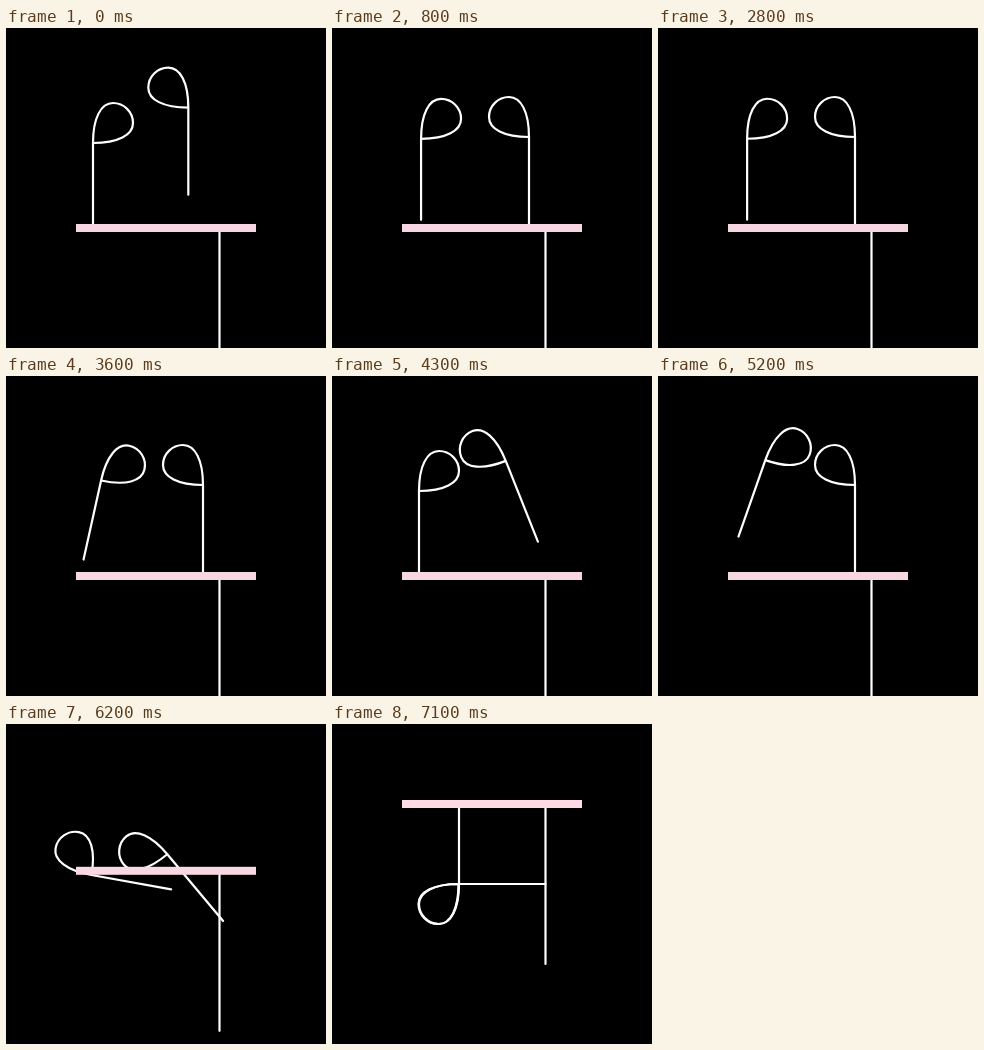
Recreate the animation shown at these times as an HTML page. Size 320x320 px, loop 8 s.

```html
<!DOCTYPE html>
<html lang="en">
<head>
<meta charset="utf-8">
<title>Walking letter</title>
<style>
  html, body { margin: 0; width: 100%; height: 100%; overflow: hidden; background: #000; }
  svg { display: block; width: 100%; height: 100%; }
  path { fill: none; stroke: #fff; stroke-width: 2.2; stroke-linecap: round; stroke-linejoin: round; }
</style>
</head>
<body>
<svg viewBox="0 0 320 320">
  <path id="left" d="M87 196V115c0-25 8-40 20-40c11 0 20 9 20 20c0 12-15 20-40 20"/>
  <path id="right" d="M197 196V109c0-25-8-40-20-40c-11 0-20 9-20 20c0 12 15 20 40 20"/>
  <g id="table">
    <path d="M213.5 200V360"/>
    <rect id="bar" x="70" y="196" width="180" height="8"/>
  </g>
</svg>
<script>
const LOOP = 8000, FRAME = 100;
const FOLD_TIME = 1455;
// Boundaries of the alternating steps: right, left, right, ...
const STEPS = [-316, 760, 1725, 2760, 3700, 4645, 5555];
const LIFT_PART = 0.4, MAX_TILT = 31, TILT_PEAK = 0.44;

const legs = [
  { node: document.getElementById('right'), side: -1, hip: [192, 138],
    fold: { hip: [205, 123], shift: [-64.5, 29], turn: -90 } },
  { node: document.getElementById('left'), side: 1, hip: [105, 134],
    fold: { hip: [104.5, 133.5], shift: [5, 8], turn: -180 } }
];
const table = document.getElementById('table');
const bar = document.getElementById('bar');

const mix = (a, b, t) => a + (b - a) * t;

function place(leg, x, y, angle, hip) {
  leg.node.setAttribute('transform', `translate(${x} ${y}) rotate(${angle} ${hip})`);
}

// Rise upright, then come down while swinging out and back.
function step(leg, p) {
  const rising = p < LIFT_PART;
  const height = rising ? p / LIFT_PART : (1 - p) / (1 - LIFT_PART);
  const swing = rising ? 0 : Math.min(height / TILT_PEAK, (1 - height) / (1 - TILT_PEAK));
  place(leg, leg.side * 20 * height, -40 * height, leg.side * MAX_TILT * swing, leg.hip);
}

function draw(time) {
  const foldStart = STEPS[STEPS.length - 1];
  const t = Math.min(1, Math.max(0, (time - foldStart) / FOLD_TIME));
  const current = STEPS.findIndex((start, i) => time >= start && time < STEPS[i + 1]);

  legs.forEach((leg, i) => {
    const { hip, shift, turn } = leg.fold;
    if (current >= 0 && current % 2 === i) {
      step(leg, (time - STEPS[current]) / (STEPS[current + 1] - STEPS[current]));
    } else {
      place(leg, shift[0] * t, shift[1] * t, turn * t, hip);
    }
  });

  table.setAttribute('transform', `translate(0 ${-120 * t})`);
  bar.setAttribute('fill', `rgb(${mix(246, 255, t)}, ${mix(214, 219, t)}, 227)`);
}

const begin = performance.now();
function tick() {
  const time = (performance.now() - begin) % LOOP;
  draw(Math.floor(time / FRAME) * FRAME);
  requestAnimationFrame(tick);
}
tick();
</script>
</body>
</html>
```
